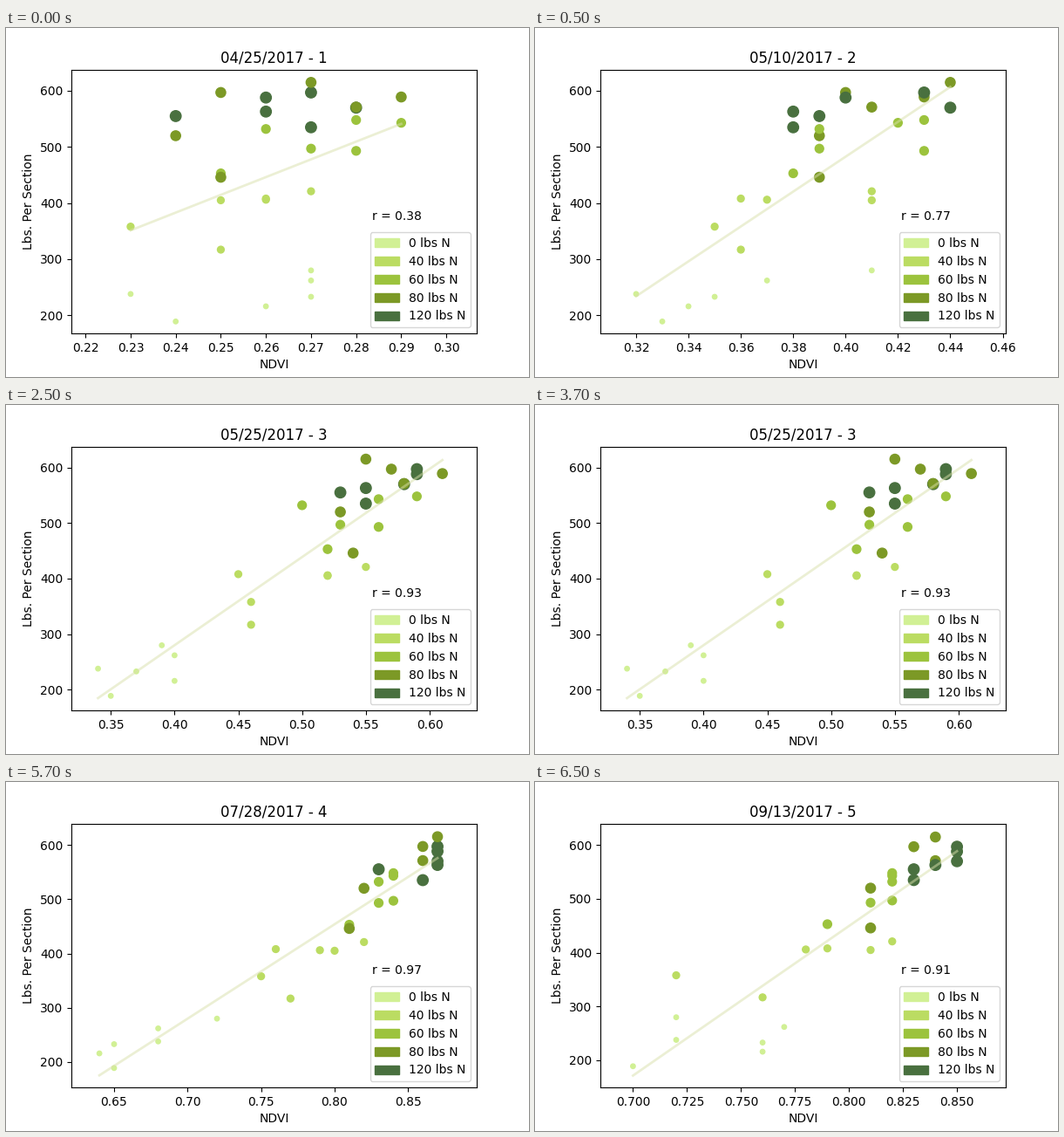
A matplotlib script for the animation above (8000 ms loop, 600 by 400 pixels).

```python
import numpy as np
import matplotlib.pyplot as plt
from matplotlib.animation import FuncAnimation
from matplotlib.patches import Patch

STEP_MS, STEPS = 500, 16
RATES = [0, 40, 60, 80, 120]
COLORS = ["#d1f095", "#bbdc62", "#9cc33d", "#7c9926", "#49703f"]
SIZES = [15, 32, 50, 65, 80]

# Six plots per nitrogen rate, yields ascending within each rate.
YIELDS = np.array([189, 216, 233, 238, 262, 280,
                   317, 358, 405, 406, 408, 421,
                   453, 493, 497, 532, 543, 548,
                   446, 520, 571, 589, 597, 615,
                   535, 555, 563, 570, 588, 597])
POINT_COLORS = np.repeat(COLORS, 6)
POINT_SIZES = np.repeat(SIZES, 6)
STACK = [*range(15), 16, 17, 27, 18, 19, 15, 20, 21, 22,
         24, 25, 26, 28, 29, 23]

# title, x limits, y limits, NDVI in hundredths
SURVEYS = [
    ("04/25/2017 - 1", (.21687, .30673), (167.8, 637.3),
     [24, 26, 27, 23, 27, 27, 25, 23, 25, 26, 26, 27, 25, 28, 27,
      26, 29, 28, 25, 24, 28, 29, 25, 27, 27, 24, 26, 28, 26, 27]),
    ("05/10/2017 - 2", (.30635, .46116), (167.8, 637.3),
     [33, 34, 35, 32, 37, 41, 36, 35, 41, 37, 36, 41, 38, 43, 39,
      39, 42, 43, 39, 39, 41, 43, 40, 44, 38, 39, 38, 44, 40, 43]),
    ("05/25/2017 - 3", (.3191, .6369), (162.9, 637.05),
     [35, 40, 37, 34, 40, 39, 46, 46, 52, 52, 45, 55, 52, 56, 53,
      50, 56, 59, 54, 53, 58, 61, 57, 55, 55, 53, 55, 58, 59, 59]),
    ("07/28/2017 - 4", (.62095, .89666), (153.4, 638.6),
     [65, 64, 65, 68, 68, 72, 77, 75, 80, 79, 76, 82, 81, 83, 84,
      83, 84, 84, 81, 82, 86, 87, 86, 87, 86, 83, 87, 87, 87, 87]),
    ("09/13/2017 - 5", (.6849, .87255), (149.7, 639.4),
     [70, 76, 76, 72, 77, 72, 76, 72, 81, 78, 79, 82, 79, 81, 82,
      82, 82, 82, 81, 81, 84, 85, 83, 84, 83, 83, 84, 85, 85, 85]),
]

plt.rcParams["font.family"] = "DejaVu Sans"
fig = plt.figure(figsize=(6, 4), dpi=100)
ax = fig.add_axes([0.125, 0.125, 0.775, 0.755])


def draw_survey(title, xlim, ylim, hundredths):
    ndvi = np.array(hundredths) / 100
    ax.clear()
    ax.scatter(ndvi[STACK], YIELDS[STACK], s=POINT_SIZES[STACK],
               c=POINT_COLORS[STACK])

    ends = np.array([ndvi.min(), ndvi.max()])
    ax.plot(ends, np.polyval(np.polyfit(ndvi, YIELDS, 1), ends),
            color="#d9e0ab", alpha=0.5, lw=2)
    r = np.corrcoef(ndvi, YIELDS)[0, 1]
    ax.text(0.742, 0.43, f"r = {r:.2f}", transform=ax.transAxes)

    ax.set(title=title, xlabel="NDVI", ylabel="Lbs. Per Section",
           xlim=xlim, ylim=ylim)
    ax.legend(handles=[Patch(color=c, label=f"{n} lbs N")
                       for n, c in zip(RATES, COLORS)], loc="lower right")


def update(step):
    # The first survey shows for one step, the others for four each.
    draw_survey(*SURVEYS[(step + 3) // 4])
    return ax.get_children()


anim = FuncAnimation(fig, update, frames=STEPS, interval=STEP_MS,
                     init_func=lambda: [], repeat=True, repeat_delay=0)
plt.show()
```
